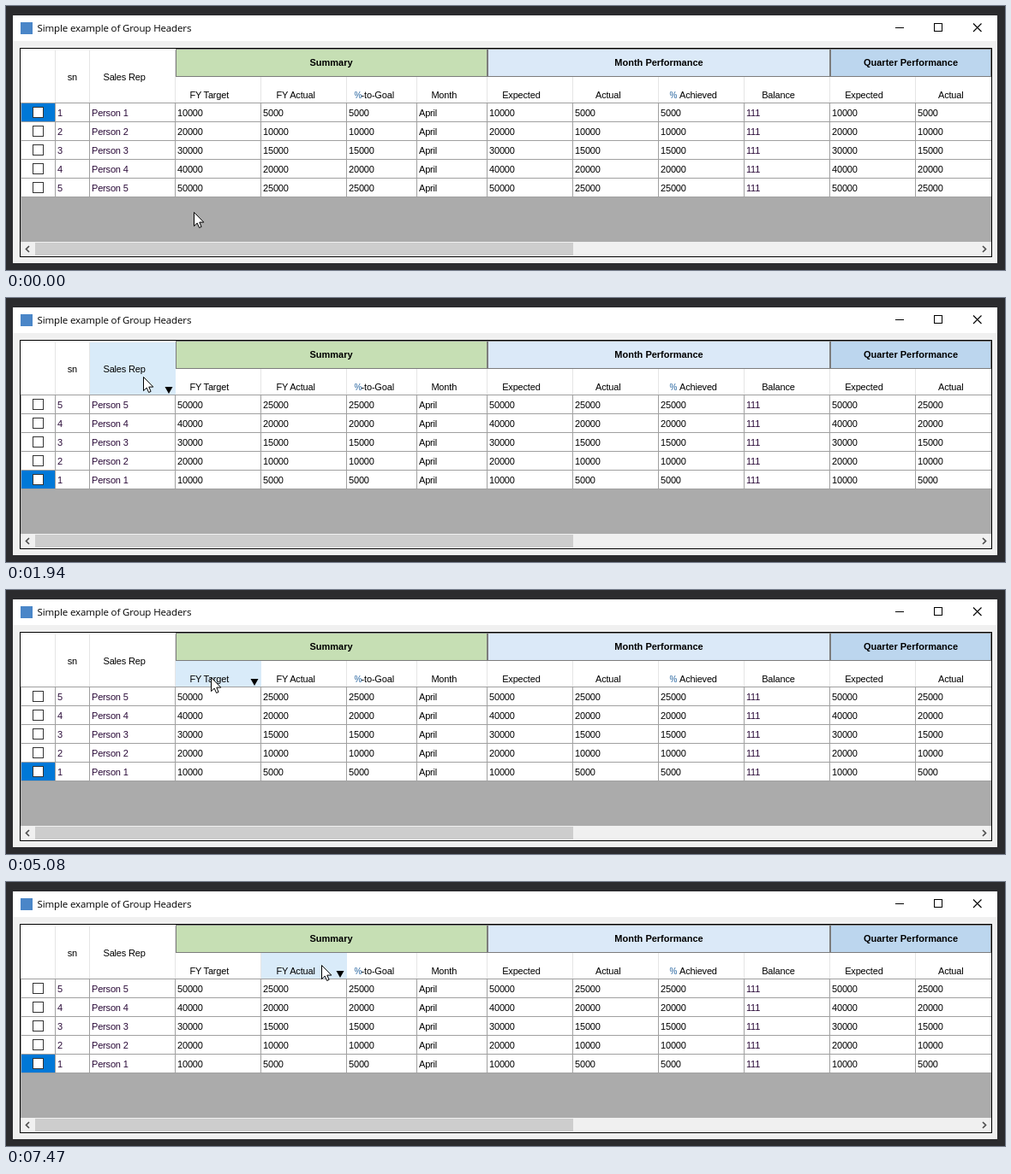
Write an HTML page that moves like this. It is 1166 px wide and 309 px high and loops after 8 s.

```html
<!DOCTYPE html>
<html lang="en">
<head>
<meta charset="utf-8">
<title>Group Headers</title>
<style>
  html, body { margin: 0; width: 100%; height: 100%; overflow: hidden; background: #2b2b2e; }
  svg { display: block; width: 100vw; height: 100vh; }
  rect, .line { shape-rendering: crispEdges; }
  text { font: 11px "Liberation Sans", Arial, sans-serif; letter-spacing: -0.18px; fill: #000; white-space: pre; }
  .title { font: 11.5px "Open Sans", "Noto Sans", sans-serif; letter-spacing: -0.13px; }
  .group { font-weight: bold; letter-spacing: 0; text-anchor: middle; }
  .percent { font-size: 10px; fill: #1f5f9c; }
  .tint { fill: #2a0a38; }
</style>
</head>
<body>
<svg id="stage" viewBox="0 0 1166 309" xmlns="http://www.w3.org/2000/svg"></svg>
<script>
const LOOP = 8000;
const stage = document.getElementById("stage");

function add(parent, tag, attrs, content) {
  const el = document.createElementNS("http://www.w3.org/2000/svg", tag);
  for (const key in attrs) el.setAttribute(key, attrs[key]);
  if (content !== undefined) el.textContent = content;
  parent.appendChild(el);
  return el;
}
const box = (parent, x, y, width, height, fill, more) =>
  add(parent, "rect", { x, y, width, height, fill, ...more });
const label = (parent, x, y, content, cls = "") =>
  add(parent, "text", { x, y, class: cls }, content);
const stroke = (parent, d, color, width = 1, cls = "") =>
  add(parent, "path", { d, fill: "none", stroke: color, "stroke-width": width, class: cls });

// Window frame
box(stage, 0, 0, 1166, 309, "#2b2b2e");
box(stage, 8, 11, 1149, 290, "#f0f0f0");
box(stage, 8, 11, 1149, 30, "#fff");
box(stage, 17, 19, 14, 14, "#4a86c8");
label(stage, 36.5, 30, "Simple example of Group Headers", "title");
stroke(stage, "M1038 25.5H1048", "#000", 1, "line");
stroke(stage, "M1083.5 20.5H1092.5V29.5H1083.5Z", "#000", 1, "line");
stroke(stage, "M1129 20.5L1138.5 30M1138.5 20.5L1129 30", "#000", 1.1);

// Grid background
box(stage, 16, 49, 1135, 245, "#000");
box(stage, 17, 50, 1133, 243, "#ababab");
box(stage, 17, 50, 1133, 174, "#fff");

// Scroll bar
box(stage, 17, 276, 1133, 17, "#f0f0f0");
box(stage, 34, 277, 628, 15, "#cdcdcd");
stroke(stage, "M27 281L23.5 284.5L27 288M1140 281L1143.5 284.5L1140 288", "#505050", 1.7);

// Header cells that react to the pointer
const headers = [
  { x: 98, y: 52, right: 198 },
  { x: 198, y: 83, right: 298 },
  { x: 298, y: 83, right: 398 }
];
const edges = [57, 97, 197, 297, 397, 479, 561, 661, 761, 861, 961, 1061];
edges.forEach((x, i) => {
  const top = i < 3 ? 52 : 83;
  box(stage, x, top, 1, 113 - top, "#e5e5e5");
});
const hot = box(stage, 0, 0, 100, 30, "#d9ebf9");

// Group captions
[[198, 561, "#c6dfb4", "Summary", 379.5],
 [562, 961, "#dbe9f8", "Month Performance", 762],
 [962, 1149, "#bcd6ee", "Quarter Performance", 1056]].forEach(([x, right, fill, name, mid]) => {
  box(stage, x + .5, 50.5, right - x, 32, fill, { stroke: "#7c7c7c" });
  label(stage, mid, 70, name, "group");
});

// Column captions
label(stage, 71.8, 87, "sn");
label(stage, 113.5, 87, "Sales Rep");
[[214.4, "FY Target"], [315.4, "FY Actual"], [414.6, "-to-Goal"], [496.4, "Month"],
 [579.2, "Expected"], [688, "Actual"], [786, "Achieved"], [882.2, "Balance"],
 [979.2, "Expected"], [1088, "Actual"]].forEach(([x, name]) => label(stage, x, 108, name));
for (const x of [406.6, 774.6]) label(stage, x, 108, "%", "percent");

// Rows, each in a group that moves when the order changes
const rows = [1, 2, 3, 4, 5].map(n => {
  const row = add(stage, "g", {});
  if (n === 1) box(row, 18, 114, 39, 21, "#0078d7");
  box(row, 31.5, 118.5, 12, 12, "#fff", { stroke: "#333" });
  const goal = n * 10000, done = n * 5000;
  const cells = [n, "Person " + n, goal, done, done, "April", goal, done, done, "111", goal, done];
  cells.forEach((value, i) =>
    label(row, edges[i] + 3, 129, value, i < 2 || i === 9 ? "tint" : ""));
  return row;
});
box(stage, 17, 113, 1, 111, "#a0a0a0");
for (const x of edges) box(stage, x, 113, 1, 111, "#a0a0a0");
for (let i = 0; i < 6; i++) box(stage, 17, 113 + 22 * i, 1133, 1, "#a0a0a0");

const glyph = add(stage, "path", { fill: "#000" });
const pointer = add(stage, "path", {
  d: "M.5 .5V16.6L4.2 13.1L6.6 18.5L9.1 17.4L6.8 12.1H11.8Z",
  fill: "#fff", stroke: "#000", "stroke-width": 1, "stroke-linejoin": "round"
});

// Pointer moves: start, end, from, to, number of steps
const moves = [
  { start: 30, end: 440, from: [219, 241], to: [160, 92], steps: 17 },
  { start: 3540, end: 3710, from: [160, 92], to: [237, 102], steps: 8 },
  { start: 3860, end: 3890, from: [237, 102], to: [239, 102], steps: 2 },
  { start: 6190, end: 6570, from: [239, 102], to: [368, 97], steps: 13 }
];
// Clicks: press, release, header, descending
const clicks = [
  [900, 1030, 0, false],
  [1800, 1930, 0, true],
  [2790, 2910, 0, false],
  [4100, 4230, 1, false],
  [4930, 5070, 1, true],
  [5570, 5700, 1, false],
  [6900, 6980, 2, false],
  [7230, 7390, 2, true]
];
const ease = u => u * u * (3 - 2 * u);

function pointerAt(t) {
  let at = moves[0].from;
  for (const m of moves) {
    if (t < m.start) break;
    const u = Math.min(1, (t - m.start) / (m.end - m.start));
    const step = Math.floor(u * (m.steps - 1) + 1e-6) + 1;
    const k = ease(step / m.steps);
    at = m.from.map((v, i) => Math.round(v + (m.to[i] - v) * k));
  }
  return at;
}

function draw(t) {
  const [px, py] = pointerAt(t);
  pointer.setAttribute("transform", `translate(${px} ${py})`);

  const over = headers.find(h => px >= h.x && px < h.right && py >= h.y && py < 113);
  const pressed = clicks.some(([down, up]) => t >= down && t < up);
  hot.setAttribute("visibility", over ? "visible" : "hidden");
  if (over) {
    hot.setAttribute("x", over.x);
    hot.setAttribute("y", over.y);
    hot.setAttribute("height", 113 - over.y);
    hot.setAttribute("fill", pressed ? "#bcdcf4" : "#d9ebf9");
  }

  const last = clicks.filter(c => t >= c[1]).pop();
  const down = !!last && last[3];
  glyph.setAttribute("visibility", last ? "visible" : "hidden");
  if (last) {
    const x = headers[last[2]].right - 8;
    glyph.setAttribute("d", down
      ? `M${x - 4.5} 104H${x + 4.5}L${x} 112Z`
      : `M${x - 4.5} 112H${x + 4.5}L${x} 104Z`);
  }
  rows.forEach((row, i) =>
    row.setAttribute("transform", `translate(0 ${22 * (down ? 4 - i : i)})`));
}

const begin = performance.now();
function tick() {
  draw((performance.now() - begin) % LOOP);
  requestAnimationFrame(tick);
}
draw(0);
requestAnimationFrame(tick);
</script>
</body>
</html>
```
